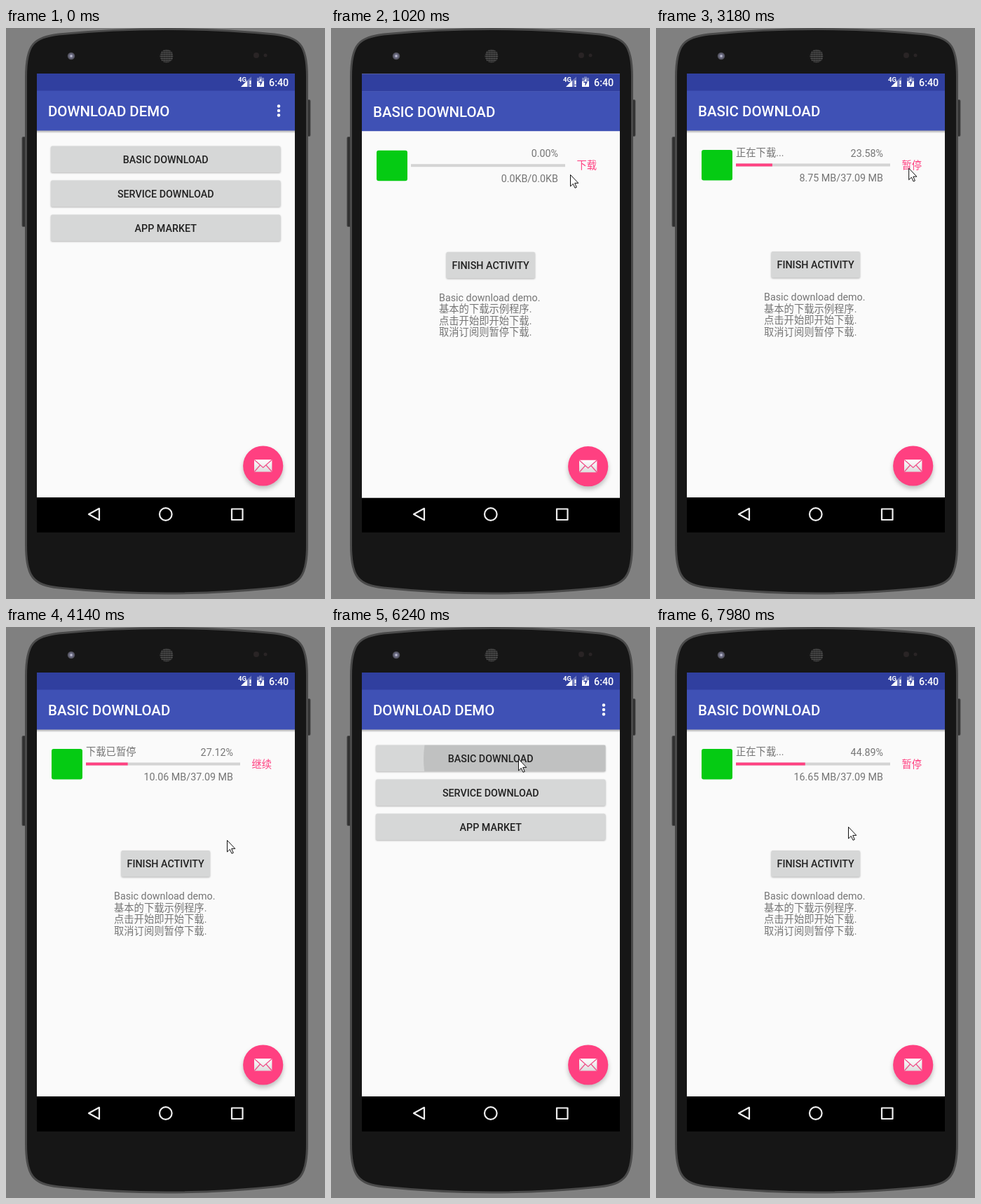
Write an HTML page that moves like this. It is 455 by 815 pixels and loops after 8 s.

```html
<!DOCTYPE html>
<html lang="zh-CN">
<head>
<meta charset="utf-8">
<title>Download demo</title>
<style>
  html, body { margin: 0; width: 100%; height: 100%; overflow: hidden; background: #808080; }
  svg { display: block; }
  text { font: 14.3px Roboto, "Noto Sans CJK SC", "Noto Sans CJK", sans-serif; fill: #757575; }
  .title { font-size: 20.44px; font-weight: 500; fill: #fff; }
  .label { font-weight: 500; fill: #212121; text-anchor: middle; }
  .end { text-anchor: end; }
  .action { text-anchor: middle; fill: #ff4081; }
  .clock { font-weight: 500; fill: #fff; }
  .net { font-size: 9.5px; font-weight: 700; fill: #fff; }
  .button { fill: #d6d7d7; filter: drop-shadow(0 1px 1px rgba(0, 0, 0, .28)); }
  .fab { fill: #ff4081; filter: drop-shadow(0 4px 3px rgba(0, 0, 0, .24)); }
</style>
</head>
<body>
<svg width="100%" height="100%" viewBox="0 0 455 815">
  <defs>
    <clipPath id="screen"><rect x="44" y="65" width="368" height="655"/></clipPath>
    <linearGradient id="shade" x2="0" y2="1">
      <stop stop-opacity=".3"/><stop offset="1" stop-opacity="0"/>
    </linearGradient>
    <linearGradient id="paper" x2="0" y2="1">
      <stop stop-color="#fff"/><stop offset="1" stop-color="#dcdcdc"/>
    </linearGradient>
    <radialGradient id="lens">
      <stop stop-color="#e6e6f2"/><stop offset=".4" stop-color="#74748e"/><stop offset="1" stop-color="#45454b"/>
    </radialGradient>
    <pattern id="mesh" width="2.8" height="2.8" patternUnits="userSpaceOnUse">
      <circle cx="1.4" cy="1.4" r="1" fill="#747474"/>
    </pattern>
    <g id="window">
      <rect x="44" y="65" width="368" height="605" fill="#fafafa"/>
      <rect x="44" y="65" width="368" height="25" fill="#303f9f"/>
      <rect x="44" y="89.5" width="368" height="57" fill="#3f51b5"/>
    </g>
    <rect id="barShadow" x="44" y="146.5" width="368" height="4" fill="url(#shade)"/>
    <g id="fab">
      <circle class="fab" cx="366.7" cy="625" r="28.6"/>
      <rect x="354" y="616" width="25.4" height="17.6" rx="1" fill="url(#paper)"/>
      <path d="M354.5 616.5 366.7 627.5 379 616.5M354.5 633 362.5 624M379 633 371 624" fill="none" stroke="#f0508a" stroke-width="1.3"/>
    </g>
  </defs>

  <rect width="455" height="815" fill="#808080"/>
  <g fill="#303030" stroke="#4c4c4c">
    <rect x="23" y="155.500" width="6" height="128" rx="1.5"/>
    <rect x="428" y="102.500" width="6" height="52" rx="1.5"/>
  </g>
  <path d="M28.500 70C28.500 22 40 14 75 9Q229-6 383 9C418 14 429.500 22 429.500 70V738C429.500 784 419 795 383 799Q229 815 75 799C39 795 28.500 784 28.500 738Z"
        fill="#161616" stroke="#4a4a4a" stroke-width="3"/>
  <circle cx="93" cy="40" r="5.300" fill="url(#lens)"/>
  <circle cx="229" cy="40" r="9.500" fill="url(#mesh)"/>
  <g fill="#292425"><circle cx="357" cy="39" r="4"/><circle cx="370" cy="39" r="2.500"/></g>

  <g clip-path="url(#screen)">
    <rect x="44" y="65" width="368" height="655"/>
    <g id="home">
      <use href="#window"/>
      <use href="#barShadow"/>
      <text class="title" x="60" y="126">DOWNLOAD DEMO</text>
      <g fill="#fff"><circle cx="389" cy="111.500" r="2.200"/><circle cx="389" cy="118" r="2.200"/><circle cx="389" cy="124.500" r="2.200"/></g>
      <rect class="button" x="64" y="168.500" width="327.500" height="37.500" rx="2"/>
      <svg x="64" y="168.500" width="327.500" height="37.500"><circle id="homeRipple"/></svg>
      <rect class="button" x="64" y="217.500" width="327.500" height="37.500" rx="2"/>
      <rect class="button" x="64" y="266.500" width="327.500" height="37.500" rx="2"/>
      <text class="label" x="227.700" y="192.500">BASIC DOWNLOAD</text>
      <text class="label" x="227.700" y="241.500">SERVICE DOWNLOAD</text>
      <text class="label" x="227.700" y="290.500">APP MARKET</text>
      <use href="#fab"/>
    </g>
    <g id="detail">
      <use href="#window"/>
      <use id="detailShadow" href="#barShadow"/>
      <text class="title" x="60" y="126">BASIC DOWNLOAD</text>
      <rect x="65" y="174" width="44" height="43.500" rx="3" fill="#05cb13"/>
      <text id="status" x="114" y="183"></text>
      <text id="percent" class="end" x="324" y="183.500"></text>
      <rect x="114" y="193.500" width="220" height="4" fill="#d4d4d4"/>
      <rect id="bar" x="114" y="193.500" height="4" fill="#ff4081"/>
      <text id="size" class="end" x="324" y="219"></text>
      <text id="action" class="action" x="364.700" y="200.500"></text>
      <rect class="button" x="164.500" y="319" width="126.500" height="37.500" rx="2"/>
      <svg x="164.500" y="319" width="126.500" height="37.500"><circle id="finishRipple"/></svg>
      <text class="label" x="227.700" y="343">FINISH ACTIVITY</text>
      <text x="154" y="389">Basic download demo.</text>
      <text x="154" y="405.500">基本的下载示例程序.</text>
      <text x="154" y="422">点击开始即开始下载.</text>
      <text x="154" y="438.500">取消订阅则暂停下载.</text>
      <use href="#fab"/>
    </g>

    <g fill="#fff">
      <text class="net" x="331" y="77" textLength="auto">4G</text>
      <path d="M335 84 344 75V84Z"/>
      <path d="M344 75 350 69.500V84H344Z" opacity=".3"/>
      <path d="M347.500 75H349.500V80.500H347.500ZM347.500 82H349.500V84H347.500Z"/>
      <path d="M358 71H361V69.500H365V71H368V77H358Z" opacity=".35"/>
      <path d="M358 76H368V84H358Z"/>
      <path d="M364 71.500 360 78H362.500V83L366 76.500H364Z" fill="#303f9f"/>
      <path d="M364 71.500 360.800 76.500H364Z"/>
      <text class="clock" x="375" y="82.700">6:40</text>
    </g>
    <g fill="none" stroke="#eee" stroke-width="2.200" stroke-linejoin="round">
      <path d="M118 694 133 685.800V702.300Z"/>
      <circle cx="227.800" cy="694" r="8.800"/>
      <rect x="322" y="686.500" width="15.500" height="15.500"/>
    </g>
  </g>
  <path id="cursor" d="M.5.5V17L4.300 13.400 7 19.300 9.300 18.300 6.700 12.400H11.800Z" fill="#fff" stroke="#111"/>
</svg>
<script>
  const LOOP = 8000, STEP = 60, TOTAL_MB = 37.09, SLIDE = 52;
  const OPENINGS = [818, 6384], CLOSING = 5084;

  const cursorPath = [
    [60, 400, 120], [180, 325, 152], [360, 283, 174], [840, 283, 174],
    [1020, 341, 209], [1320, 363, 202], [1440, 359, 198], [1740, 359, 198],
    [2220, 298, 250], [2400, 345, 199], [3480, 366, 200], [3840, 345, 235],
    [4080, 325, 288], [4140, 315, 304], [4320, 288, 330], [4860, 265, 336],
    [5040, 265, 336], [5280, 259.5, 216], [5340, 259, 213], [5520, 259, 213],
    [5640, 267, 188], [6360, 267, 188], [6540, 361.500, 196], [6660, 363, 200],
    [7260, 363, 200], [7560, 335, 245], [7860, 301, 294], [7980, 274, 285]
  ];
  const progress = [
    [0, 0], [1980, 4.85], [2160, 11.52], [2460, 15.14], [2760, 19.36], [3060, 23.58],
    [3360, 27.12], [6000, 0], [7260, 27.12], [7440, 32.35], [7620, 36.74], [7740, 40.91], [7920, 44.89]
  ];
  const states = [
    [0, '', '下载'], [1680, '正在下载...', '暂停'], [3480, '下载已暂停', '继续'],
    [6000, '', '下载'], [7140, '正在下载...', '暂停']
  ];

  const $ = id => document.getElementById(id);
  const clamp = v => Math.min(1, Math.max(0, v));
  const easeOut = (v, power) => 1 - (1 - clamp(v)) ** power;
  const latest = (list, t) => list.filter(item => item[0] <= t).pop();

  function moveCursor(t) {
    const from = latest(cursorPath, t);
    $('cursor').setAttribute('visibility', from ? 'visible' : 'hidden');
    if (!from) return;
    const to = cursorPath.find(key => key[0] > t) || from;
    const u = to === from ? 0 : (t - from[0]) / (to[0] - from[0]);
    const [x, y] = [1, 2].map(i => from[i] + (to[i] - from[i]) * u);
    $('cursor').setAttribute('transform', `translate(${x} ${y})`);
  }

  function ripple(id, age, duration, x, y, reach) {
    const u = clamp(age / duration);
    const dot = $(id);
    dot.setAttribute('cx', x);
    dot.setAttribute('cy', y);
    dot.setAttribute('r', age < 0 ? 0 : 15 + reach * u);
    dot.setAttribute('opacity', age > duration ? 0 : .1);
  }

  function moveWindows(t) {
    const open = OPENINGS.filter(start => start <= t).pop();
    let offset = SLIDE, alpha = 0, dim = 0, settled = false;
    if (t >= CLOSING && t < OPENINGS[1]) {
      const age = t - CLOSING;
      offset = SLIDE * clamp(age / 250) ** 4;
      alpha = 1 - clamp((age - 100) / 150);
      dim = .3 * (1 - clamp(age / 300)) ** 2;
    } else if (open !== undefined) {
      const age = t - open;
      offset = SLIDE * (1 - easeOut(age / 350, 5));
      alpha = easeOut(age / 200, 3);
      dim = .3 * easeOut(age / 217, 5);
      settled = age > 350;
    }
    $('home').setAttribute('opacity', 1 - dim);
    $('detail').setAttribute('opacity', alpha);
    $('detail').setAttribute('transform', `translate(0 ${offset})`);
    $('detailShadow').setAttribute('opacity', settled ? 1 : 0);
  }

  function showProgress(t) {
    const percent = latest(progress, t)[1];
    const [, status, action] = latest(states, t);
    $('status').textContent = status;
    $('action').textContent = action;
    $('percent').textContent = percent.toFixed(2) + '%';
    $('size').textContent = percent
      ? `${(percent * TOTAL_MB / 100).toFixed(2)} MB/${TOTAL_MB} MB` : '0.0KB/0.0KB';
    $('bar').setAttribute('width', 2.2 * percent);
  }

  function draw(now) {
    const t = Math.floor(now % LOOP / STEP) * STEP;
    moveWindows(t);
    showProgress(t);
    if (t < 5000) ripple('homeRipple', t - 540, 420, 219, 6, 220);
    else ripple('homeRipple', t - 5880, 600, 203, 20, 200);
    ripple('finishRipple', t - 4980, 300, 100, 17, 100);
    moveCursor(t);
    requestAnimationFrame(draw);
  }
  draw(performance.now());
</script>
</body>
</html>
```
